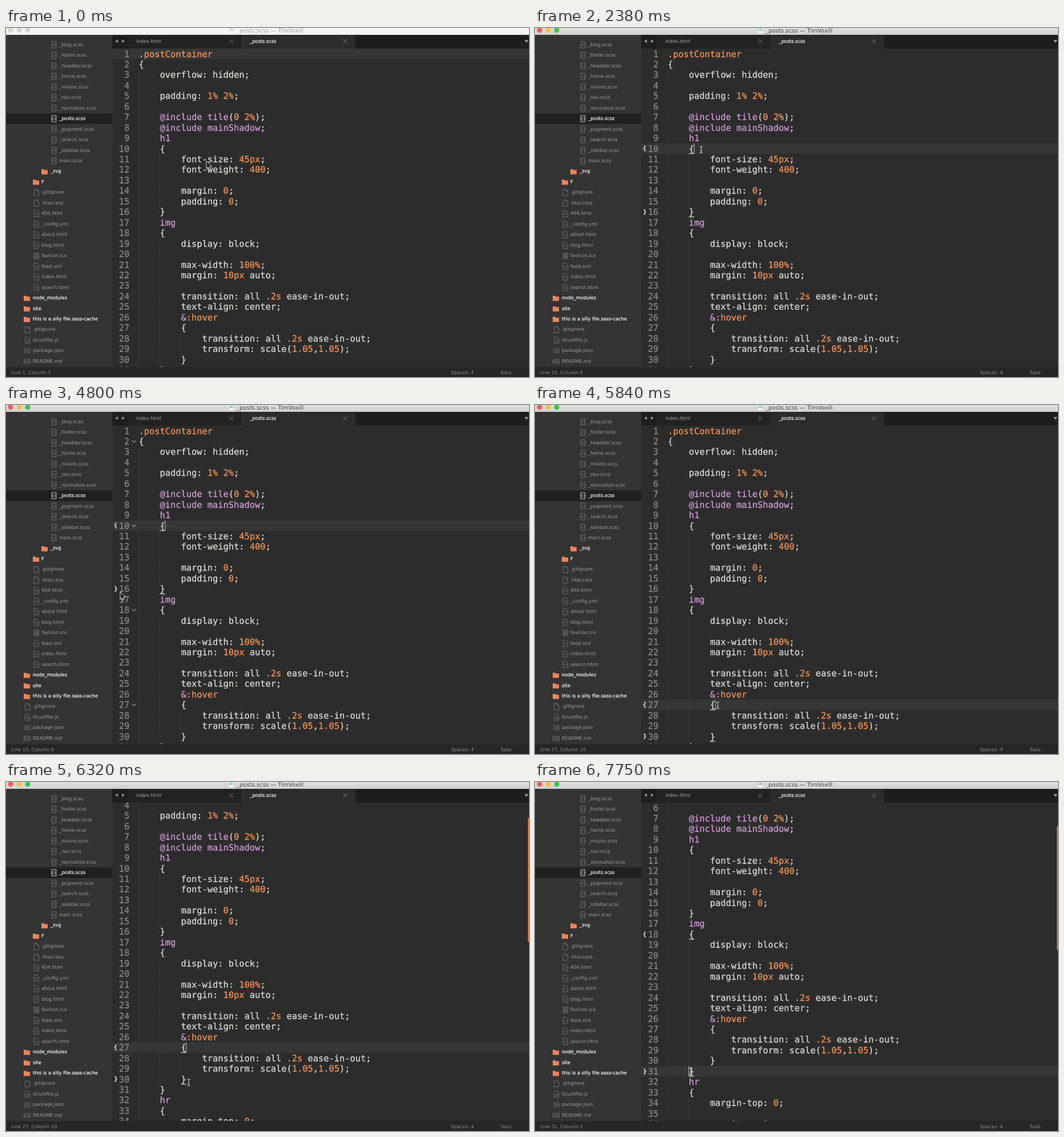
An HTML page that plays this animation: 916x611 px, repeating every 8000 ms.

```html
<!DOCTYPE html>
<html lang="en">
<head>
<meta charset="utf-8">
<title>Editor</title>
<style>
  html, body { margin: 0; width: 100%; height: 100%; overflow: hidden; background: #2c2c2c; }
  svg { display: block; width: 916px; height: 611px; }
  text { font: 8.25px "DejaVu Sans", sans-serif; white-space: pre; text-rendering: geometricPrecision; }
  .code text { font: 15.36px "DejaVu Sans Mono", monospace; fill: #e0e0d8; stroke: #e0e0d8; stroke-width: .25px; }
  .code .num { fill: #8b8c88; stroke: #8b8c88; text-anchor: end; }
  .code .mark { font-size: 10.5px; font-weight: bold; text-anchor: middle; }
  .code .purple { fill: #d59ddb; stroke: #d59ddb; }
  .code .orange { fill: #fc9453; stroke: #fc9453; }
  .side { fill: #a0a0a0; }
  .strong { fill: #fff; stroke: #fff; stroke-width: .2px; }
  .icon { fill: none; stroke: #747474; stroke-width: .9px; }
  .icon.on { stroke: #ddd; }
  .folder { fill: #f4835a; }
</style>
</head>
<body>
<svg viewBox="0 0 916 611" xmlns="http://www.w3.org/2000/svg">
  <defs>
    <clipPath id="pane"><rect x="186" y="36" width="730" height="557.5"/></clipPath>
    <linearGradient id="chrome" x2="0" y2="1">
      <stop offset="0" stop-color="#e0e0e0"/><stop offset="1" stop-color="#d1d1d1"/>
    </linearGradient>
  </defs>
  <rect width="916" height="611" fill="#2c2c2c"/>
  <rect y="12" width="186" height="582" fill="#343434"/>
  <rect y="149.5" width="186" height="18.5" fill="#202020"/>
  <g id="sidebar"></g>

  <g clip-path="url(#pane)">
    <g id="scroll" class="code">
      <rect id="row" x="186" width="730" height="18.45" fill="#363636"/>
      <g id="lines"></g>
      <g id="folds" fill="none" stroke="#9a9a9a" stroke-width="1.2"></g>
      <g id="brackets">
        <text id="openMark" class="mark" x="192">{</text>
        <text id="closeMark" class="mark" x="192.5">}</text>
        <rect id="openLine" width="9.25" height="1.2" fill="#dfdfd6"/>
        <rect id="closeLine" width="9.25" height="1.2" fill="#dfdfd6"/>
        <rect id="caret" width="1" height="18" fill="#b8b8b4"/>
      </g>
    </g>
    <rect id="bar" x="914" width="2" height="217" rx="1" fill="#d8743f"/>
  </g>

  <rect x="186" y="12" width="730" height="24" fill="#1d1d1d"/>
  <rect x="212" y="13" width="199" height="23" fill="#222"/>
  <rect x="412" y="13" width="199.5" height="23" fill="#2c2c2c"/>
  <path d="M196 20v6l-5-3zM203 20v6l5-3zM908 21h7l-3.5 5z" fill="#999"/>
  <path d="M391 20l7 7m0-7l-7 7M590.500 20l7 7m0-7l-7 7" stroke="#7c7c7c"/>
  <text x="228" y="26" fill="#aaa">index.html</text>
  <text x="427" y="26" class="strong">_posts.scss</text>

  <rect y="593.5" width="916" height="17.5" fill="#262626"/>
  <g fill="#8e8e8e">
    <text id="status" x="9" y="605.700"></text>
    <text x="779.5" y="605.700">Spaces: 4</text>
    <text x="866.500" y="605.700">Sass</text>
  </g>

  <rect id="titlebar" width="916" height="12"/>
  <g id="lights"></g>
  <g id="docIcon">
    <path d="M390.500-2h8.500v11.500h-8.500z" fill="#fff" stroke="#bbb" stroke-width=".6"/>
    <path d="M392 2h5.500M392 4.500h5.500" stroke="#52b79a" stroke-width="1.3"/>
  </g>
  <text id="title" x="404" y="7.700" style="font-size:10px">_posts.scss — TimVoxill</text>

  <path id="arrow" d="M0 0V13.200L3 10.500L5 15L7.200 14L5.300 9.600H9.300Z" fill="#111" stroke="#eee" stroke-width="1"/>
  <path id="beam" d="M-3-6Q0-6 0-4Q0-6 3-6M0-4V4M-3 6Q0 6 0 4Q0 6 3 6M-1.500 2H1.500" fill="none" stroke="#d8d8d8" stroke-width="1"/>
</svg>
<script>
const $ = id => document.getElementById(id);
const set = (el, attrs) => { for (const k in attrs) el.setAttribute(k, attrs[k]); };

const ROW = 18.45, TOP = 36, CHAR = 9.25, LEFT = 232.5, LOOP = 8000;
const rowTop = line => TOP + (line - 1) * ROW;
const colX = col => LEFT + col * CHAR;

const source = `.postContainer
{
    overflow: hidden;

    padding: 1% 2%;

    @include tile(0 2%);
    @include mainShadow;
    h1
    {
        font-size: 45px;
        font-weight: 400;

        margin: 0;
        padding: 0;
    }
    img
    {
        display: block;

        max-width: 100%;
        margin: 10px auto;

        transition: all .2s ease-in-out;
        text-align: center;
        &:hover
        {
            transition: all .2s ease-in-out;
            transform: scale(1.05,1.05);
        }
    }
    hr
    {
        margin-top: 0;

        opacity: .8;`.split('\n');

const tokens = /(@include|tile|mainShadow|\b(?:h1|img|hr)$|&)|(^\.\w+|:hover|\.?\d[\d.]*(?:px|%|s)?)/g;
const paint = text => text.replace(tokens, (all, purple) =>
  `<tspan class="${purple ? 'purple' : 'orange'}">${all.replace('&', '&amp;')}</tspan>`);

let depth = 0;
$('lines').innerHTML = source.map((raw, i) => {
  const text = raw.trim(), top = rowTop(i + 1), base = top + 14.5;
  if (text === '}') depth--;
  let out = `<text class="num" x="216.300" y="${base}">${i + 1}</text>`;
  for (let d = 0; d < depth; d++)
    out += `<rect x="${colX(d * 4) - .5}" y="${top}" width="1" height="${ROW}" fill="#383838"/>`;
  out += `<text x="${colX(raw.length - raw.trimStart().length)}" y="${base}">${paint(text)}</text>`;
  if (text === '{') depth++;
  return out;
}).join('');

$('folds').innerHTML = [2, 10, 18, 27]
  .map(n => `<path d="M220.500 ${rowTop(n) + 7.5}l3.500 3.500l3.500-3.500"/>`).join('');

// Sidebar entries: icon kind, icon x, text x, names
const page = 'M.5-5.500H6L9-2.500V5.500H.5Z';
const icons = {
  scss: 'M.5-5.500H8.500V5.500H.5ZM3.500-3Q2.500-3 2.500-1T2 0Q2.500 0 2.500 1.500T3.500 3M5.500-3Q6.500-3 6.500-1T7 0Q6.500 0 6.500 1.500T5.500 3',
  doc: page + 'M6-5.500V-2.500H9',
  html: page + 'M4-1.500L2.500 .5L4 2.500M5.500-1.500L7 .5L5.500 2.500',
  image: 'M.5-5H9V5H.5ZM2 3V-1H7.500V3ZM2-3H7.500M3.500 2L5 0L6.500 2',
  js: page + 'M4-1V3H2.500M7-1H5.500V1H7V3H5.500',
  json: 'M1-5V5M4-5V5M7-5V5M10-5V5M0-2H2M3 2H5M6-1H8M9 2H11',
  md: 'M0-3.500H11V3.500H0ZM2 2V-1.500L3.500 0L5-1.500V2M8-2V2M6.700 .5L8 2L9.300 .5',
};
const groups = [
  ['scss', 79.5, 93, '_blog.scss _footer.scss _headder.scss _home.scss _mixins.scss _nav.scss _normalize.scss _posts.scss _pygment.scss _search.scss _sidebar.scss main.scss'],
  ['folder', 62, 78, '_svg'],
  ['folder', 47, 62, 'F'],
  ['doc', 48.5, 62, '.gitignore .htaccess'],
  ['html', 48.5, 62, '404.html _config.yml about.html blog.html'],
  ['image', 48.5, 62, 'favicon.ico'],
  ['html', 48.5, 62, 'feed.xml index.html search.html'],
  ['folder', 31, 47, 'node_modules site this\u00a0is\u00a0a\u00a0silly\u00a0file.sass-cache'],
  ['doc', 33, 47, '.gitignore'],
  ['js', 33, 47, 'Gruntfile.js'],
  ['json', 32, 47, 'package.json'],
  ['md', 31.5, 47, 'README.md'],
];
let y = 29;
$('sidebar').innerHTML = groups.flatMap(([kind, ix, tx, names]) => names.split(' ').map(name => {
  const on = name === '_posts.scss', folder = kind === 'folder';
  const icon = folder
    ? `<path class="folder" d="M${ix} ${y - 3.5}h4.500l1 1.500h5.500v7.500h-11z"/>`
    : `<path class="icon${on ? ' on' : ''}" transform="translate(${ix} ${y + .5})" d="${icons[kind]}"/>`;
  const label = `<text class="${on || folder ? 'strong' : 'side'}" x="${tx}" y="${y + 2.8}">${name}</text>`;
  y += 18.47;
  return icon + label;
})).join('');

$('lights').innerHTML = [8, 23, 38].map(x => `<circle cx="${x}" cy="3.800" r="4.600"/>`).join('');

// Step tables: time first, then the values held until the next entry
const pointer = [
  [0, 351, 233, 'arrow'], [300, 350.5, 232.5, 'arrow'], [690, 350, 232, 'arrow'],
  [990, 346, 229, 'arrow'], [1140, 335, 220, 'arrow'], [1290, 322, 210, 'arrow'],
  [1430, 316, 206, 'arrow'], [2020, 300, 211, 'beam'], [2380, 291, 213, 'beam'],
  [2890, 282, 214, 'beam'], [3040, 255, 213, 'beam'], [3190, 222, 211, 'arrow'],
  [3340, 203, 209, 'arrow'], [3480, 197, 209, 'arrow'], [3630, 196, 212, 'arrow'],
  [3780, 197, 215, 'arrow'], [3930, 197, 217, 'arrow'], [4070, 197, 240, 'arrow'],
  [4220, 197, 285, 'arrow'], [4370, 197, 317, 'arrow'], [4510, 197, 322, 'arrow'],
  [4660, 200, 327, 'arrow'], [4810, 225, 370, 'arrow'], [4950, 284, 450, 'beam'],
  [5100, 326, 510, 'beam'], [5250, 330, 523, 'beam'], [5400, 328, 526, 'beam'],
  [5550, 320, 526, 'beam'], [6950, 318, 525, 'beam'], [7160, 312, 521, 'beam'],
  [7310, 295, 513, 'beam'], [7460, 279, 507, 'beam'], [7600, 273, 506, 'beam'],
];
const scrolling = [[0, 0], [6170, 24], [6320, 60], [6530, 84], [6740, 5 * ROW]];
const folding = [[0, 0], [3190, .4], [3340, .8], [3480, 1], [4950, .7], [5100, .4], [5250, .15], [5400, 0]];
const edits = [
  [0, { line: 1, label: 'Line 1, Column 1' }],
  [2020, { line: 10, label: 'Line 10, Column 6', pair: [10, 16], col: 4, caret: 5 }],
  [5690, { line: 27, label: 'Line 27, Column 10', pair: [27, 30], col: 8, caret: 9 }],
  [7600, { line: 31, label: 'Line 31, Column 5', pair: [18, 31], col: 4, caret: 4 }],
];
const at = (table, t) => table.findLast(step => step[0] <= t).slice(1);

function drawWindow(focused) {
  set($('titlebar'), { fill: focused ? 'url(#chrome)' : '#f4f4f4' });
  set($('title'), { fill: focused ? '#444' : '#a5a5a5' });
  set($('docIcon'), { opacity: focused ? 1 : .5 });
  const colors = focused ? ['#fc5b57', '#fdbe41', '#34c84a'] : ['#d4d4d4', '#d4d4d4', '#d4d4d4'];
  [...$('lights').children].forEach((dot, i) => set(dot, { fill: colors[i] }));
}

function drawEdit({ line, label, pair, col, caret }) {
  $('status').textContent = label;
  set($('row'), { y: rowTop(line) });
  set($('brackets'), { visibility: pair ? 'visible' : 'hidden' });
  if (!pair) return;
  ['open', 'close'].forEach((name, i) => {
    set($(name + 'Mark'), { y: rowTop(pair[i]) + 12.3 });
    set($(name + 'Line'), { x: colX(col), y: rowTop(pair[i]) + 17.3 });
  });
  set($('caret'), { x: colX(caret) - .5, y: rowTop(line) });
}

function draw(t) {
  const [x, py, kind] = at(pointer, t), [offset] = at(scrolling, t);
  drawWindow(t >= 1730);
  drawEdit(at(edits, t)[0]);
  set($('scroll'), { transform: `translate(0 ${-offset})` });
  set($('bar'), { y: 37 + offset * .433, visibility: offset ? 'visible' : 'hidden' });
  set($('folds'), { opacity: at(folding, t)[0] });
  for (const id of ['arrow', 'beam'])
    set($(id), { transform: `translate(${x} ${py})`, visibility: id === kind ? 'visible' : 'hidden' });
}

const start = performance.now();
function tick() {
  draw((performance.now() - start) % LOOP);
  requestAnimationFrame(tick);
}
tick();
</script>
</body>
</html>
```
